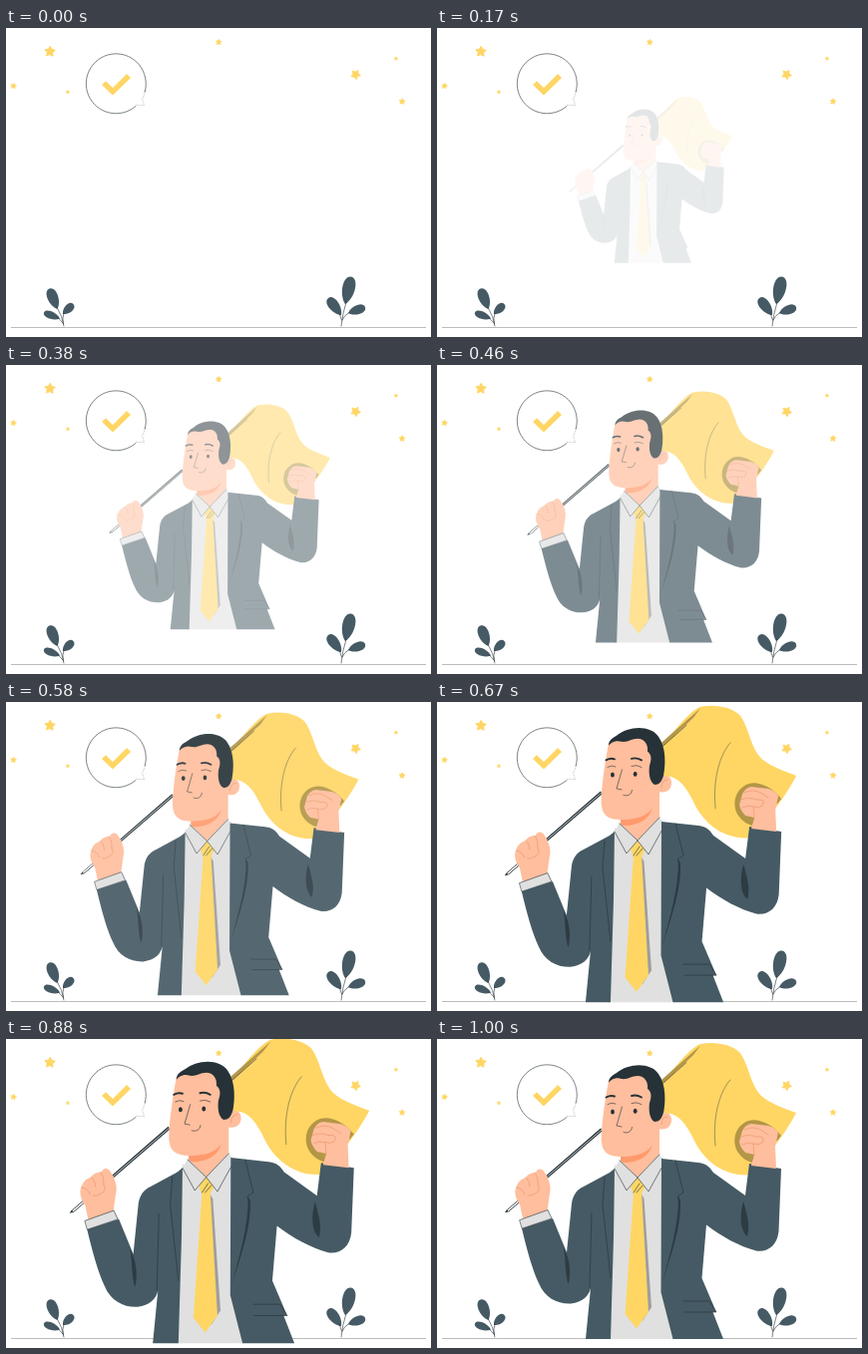
An HTML page that plays this animation: 426 by 310 pixels, repeating every 1.04 s.

```html
<!DOCTYPE html>
<html lang="en">
<head>
<meta charset="utf-8">
<title>Victory</title>
<style>
  html, body { margin: 0; width: 100%; height: 100%; overflow: hidden; background: #fff; }
  svg { display: block; width: 100%; height: 100%; }
  .suit { fill: #455a64; }
  .dark { fill: #263238; }
  .fold { fill: #2d3b43; }
  .skin { fill: #ffbe9d; }
  .gold { fill: #ffd664; }
  .shirt { fill: #e0e0e0; }
  .line { fill: none; stroke: #263238; stroke-width: .6; stroke-linecap: round; stroke-linejoin: round; }
  .bold { stroke-width: 1.9; }
  .crease { fill: none; stroke: #eb996e; stroke-width: .7; stroke-linecap: round; }
</style>
</head>
<body>
<svg viewBox="0 0 426 310">
  <path d="M5 300.5H421" stroke="#b5b5b5" stroke-width=".9"/>
  <g id="stars" class="gold" stroke="#ffd664" stroke-linejoin="round"></g>
  <g id="plants" class="suit"></g>

  <!-- speech bubble -->
  <path class="line" d="M130 78.500A30 30 0 1 1 139.200 64"/>
  <path class="line" stroke-dasharray=".8 1.600" opacity=".4" d="M139.200 64Q138 69 136.500 71L138.500 77.500L130 77.200"/>
  <path class="gold" d="M96 57L100 53.200L107 60L121 46L125 50L107 67.500Z"/>

  <g id="man">
    <!-- flag -->
    <path class="gold" d="M226 42C240 28 252 10 264 5C278 2 296 5 304 14C313 27 314 46 325 57C334 65 349 70 360 74C355 84 347 96 341 104L315 136C291 139 271 125 260 106C253 92 248 82 239 77C233 74 228 74 222 76Z"/>
    <path fill="#b3964a" d="M225 41L264 6.500L257 16L226 45Z"/>
    <path class="line" d="M227 44L250 23.500"/>
    <path class="line" opacity=".7" d="M294 41C284 52 276 76 279 107"/>
    <path fill="#b39646" d="M345 97C335 84 318 77 308 84C297 91 296 105 302 114C306 120 312 123 316 124L325 100L341 102Z"/>

    <!-- pole -->
    <path class="dark" d="M68 174.200L69.500 171.800L164 89.500L166 92L72 173.200Z"/>
    <path d="M71 172.200L165 91" stroke="#d5dadc" stroke-width=".9"/>
    <path d="M71 172.200L92 154" stroke="#fff" stroke-width="1.500"/>

    <!-- left hand -->
    <path class="skin" d="M86 180L83 166C78 160 77 152 80 147C82 142 86 140 89 139C91 135 96 134 99 134C101 129 106 130 108 134C112 140 115 148 113 155L110 176Z"/>
    <path class="crease" d="M89 139Q93 142 93 148M98 134Q102 139 101 146M80 149Q86 150 88 156M101 146Q104 151 100 154Q94 158 91 157"/>

    <!-- shirt and neck -->
    <path class="shirt" d="M178 126L202 138L226 118L230 250L238 301H170Z"/>
    <path class="skin" d="M184 105V125L201 139L223 118V80Z"/>
    <path fill="#ff9a6c" d="M184 117C200 119 211 114 216 106C212 120 198 125 184 124Z"/>

    <!-- head -->
    <path class="skin" d="M172 42C167 68 164 95 165 104C166 115 174 118 184 118C202 119 218 108 222 90C230 92 235 88 235 81C235 73 227 73 224 76L214 32L180 36Z"/>
    <path class="crease" d="M231 78Q225 78 225 86"/>
    <path class="dark" d="M172 44C172 38 177 36 180 34C192 24 214 23 222 35C230 46 229 64 227 74C225 80 223 83 218 83C213 80 212 72 213 64C216 56 214 52 211 50C212 43 208 37 201 37C195 37 191 41 185 40C179 38 174 41 172 44Z"/>
    <ellipse class="dark" cx="176" cy="73" rx="1.900" ry="2.500"/>
    <ellipse class="dark" cx="198.700" cy="72.300" rx="1.900" ry="2.500"/>
    <path class="line bold" d="M169.500 58.500Q174 56 178 57.500M195 57Q200 55.500 205 58.500"/>
    <path class="line" d="M171 65.500Q175 63 179 65M195 64.500Q200 62.500 205 65.500"/>
    <path class="line" d="M185.500 68L180 87L185 88"/>
    <path class="line" d="M187 93.500C191 95 195 93 195.500 88.500"/>

    <!-- tie and collar -->
    <path fill="#9e9e9e" d="M204 154L207.500 160L215 269L206 283Z"/>
    <path class="gold" d="M197 153H205L212 274L200 290.500L188.500 276Z"/>
    <path class="gold" d="M194 148L201 138L209 147L204.500 156H197Z"/>
    <path class="line" d="M197 154L203 145M200 154L206 147"/>
    <path class="shirt" d="M183 121L178 130L190 152L201 139ZM223 115L228 124L212 153L201 139Z"/>
    <path class="line" d="M183 122L201 139L190 152L178 130M223 116L201 139L212 153L228 124"/>

    <!-- jacket, left side -->
    <path class="suit" d="M178 130L173 134L147 148C140 151 136 157 135 165L130 214L116 180L85 190C90 211 96 233 102 245C108 260 121 266 134 265.500C146 264 152 258 154 250L149 301H174L177 200Z"/>
    <path class="fold" d="M127 209L131 219C134 230 133.500 241 131.500 246C128.500 236 129 222 127 209Z"/>
    <path class="line" d="M153 249L155 175M168 139L166 166L174 240"/>
    <path class="shirt" d="M83 181.500L111 171.500L115 180L85.500 190Z"/>
    <path class="line" d="M83 181.500L111 171.500L115 180L85.500 190Z"/>

    <!-- jacket, right side -->
    <path class="suit" d="M225 120L262 124C270 125 273 128 277 134L309 157L313 125L345 130L342.500 193C341 207 332 214 320 212.500C303 208 285 198 270 186.500L265.500 240L280 274H276.500L287 301H236.500L224.500 254Z"/>
    <path class="fold" d="M307 163C303 178 304 192 311 198C314 187 311 178 308 166Z"/>
    <path class="line" d="M239 122L247 154L241 158L243 164"/>
    <path class="fold" d="M242 158L244 162C245 188 235 215 226 244C234 213 242 188 242 158Z"/>
    <path class="line" d="M247 263H273L280 274L248 274"/>

    <!-- right fist -->
    <path class="skin" d="M315 127L318 116L309 114Q304 109 303 103L306 92Q309 86 315 85L332 87Q339 89 342 94L339 108L340 130Z"/>
    <path class="crease" d="M308 91Q316 87 324 91L332 96M305 98Q312 95 320 98M306 106Q311 103 317 105M320 98Q330 97 326 104Q322 107 317 105L318 116"/>
  </g>
</svg>
<script>
const $ = id => document.getElementById(id);

function star(x, y, r, turn) {
  const points = Array.from({ length: 10 }, (_, i) => {
    const a = turn + i * Math.PI / 5, d = i % 2 ? r * .48 : r * .92;
    return [x + d * Math.sin(a), y - d * Math.cos(a)].map(v => v.toFixed(2));
  });
  return `<polygon stroke-width="${r * .16}" points="${points.join(' ')}"/>`;
}

// A rounded leaf from its base (x, y) to its tip (x + dx, y + dy).
function leaf(x, y, dx, dy, w) {
  const k = w / Math.hypot(dx, dy), nx = -dy * k, ny = dx * k;
  const side = s => [x + dx * .3 + s * nx, y + dy * .3 + s * ny];
  const top = s => [x + dx + s * nx, y + dy + s * ny];
  return `<path d="M${x} ${y}C${side(1)} ${top(1)} ${x + dx} ${y + dy}C${top(-1)} ${side(-1)} ${x} ${y}"/>`;
}

$('stars').innerHTML = [
  [44, 23.7, 6, .05], [7.5, 58.2, 3.4, .2], [62, 64.2, 2.2, 0], [213.2, 14.3, 3.4, .1],
  [350.5, 46.7, 5.5, .5], [391, 30.7, 2.2, 0], [397, 73.8, 3.5, .1]
].map(s => star(...s)).join('');

$('plants').innerHTML = [
  [51.5, 282, -8, -20.5, 7.2], [57, 287, 10.5, -10, 5.5], [54, 291.5, -16, -6, 5],
  [340, 277, 6, -27.5, 8.5], [336, 288, -13, -17, 7], [343, 286, 17, -6, 6.2]
].map(l => leaf(...l)).join('') +
  '<path class="line" d="M58 299Q57 290 51 280M57.500 297Q56 291 58 286M57 296L52 290.500M336 299Q337 288 341 275M336.500 293L334 286M337 293Q339 288 344 285.500"/>';

const LOOP = 1040, FPS = 24, LEAD = .017, CX = 214.5, CY = 152.3;
const bezier = (a, b, s) => 3 * (1 - s) ** 2 * s * a + 3 * (1 - s) * s * s * b + s ** 3;

// Overshooting ease: cubic-bezier(.36, -.01, .5, 1.38)
function ease(x) {
  let lo = 0, hi = 1;
  for (let i = 0; i < 24; i++) {
    const mid = (lo + hi) / 2;
    if (bezier(.36, .5, mid) < x) lo = mid; else hi = mid;
  }
  return bezier(-.01, 1.38, lo);
}

function draw(now) {
  const step = Math.floor((now % LOOP + 4) * FPS / 1000);
  const p = step < 3 ? 0 : ease(Math.min(1, step / FPS + LEAD));
  const scale = .5 + p / 2;
  $('man').setAttribute('transform', `translate(${CX} ${CY}) scale(${scale}) translate(${-CX} ${-CY})`);
  $('man').setAttribute('opacity', Math.min(1, p));
}

const start = performance.now();
function tick() {
  draw(performance.now() - start);
  requestAnimationFrame(tick);
}
tick();
</script>
</body>
</html>
```
